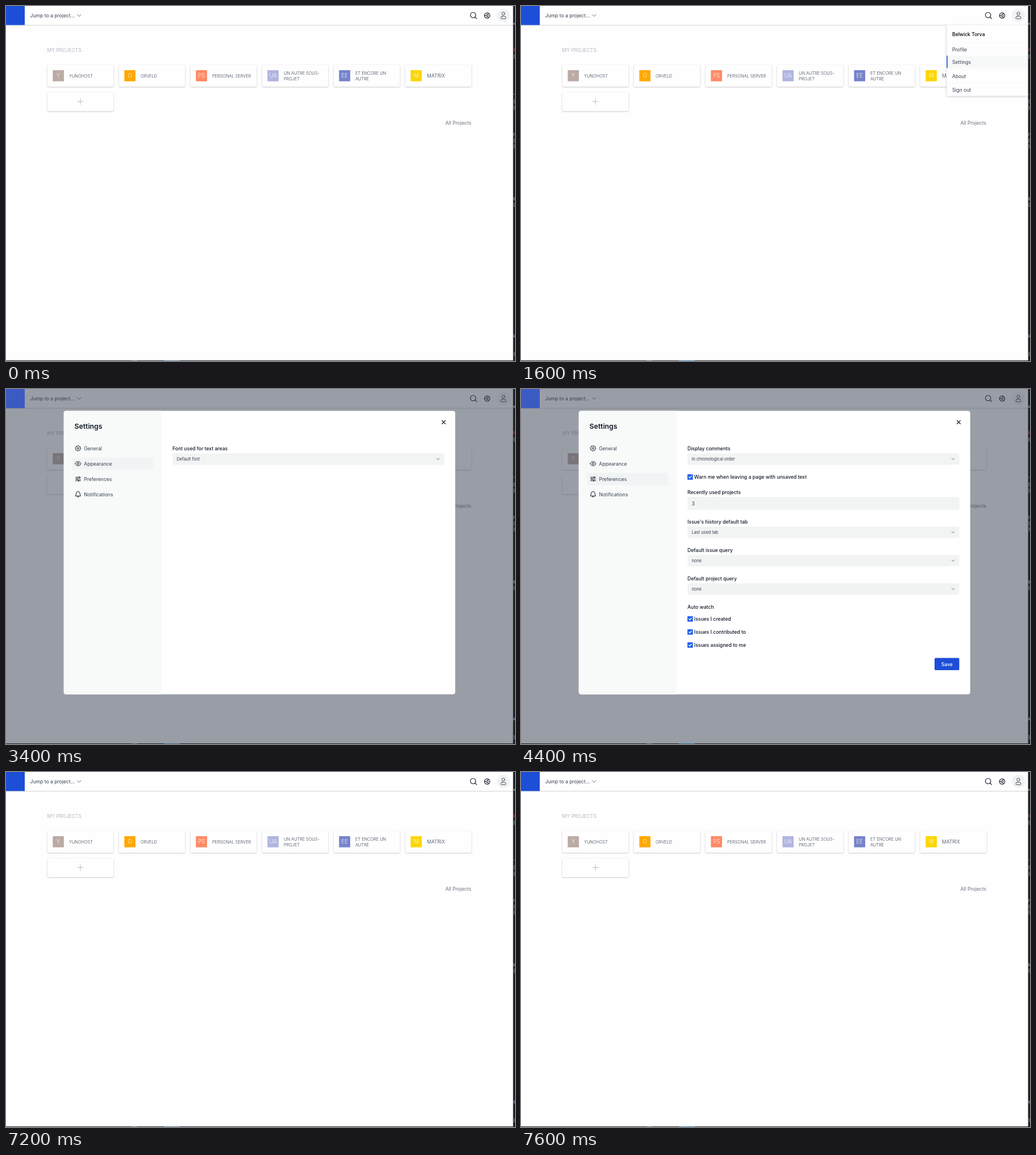
Animation of 896x625 px, one loop 7900 ms. Source, as an HTML page with a canvas:

```html
<!DOCTYPE html>
<html lang="en">
<head>
<meta charset="utf-8">
<title>Project settings</title>
<style>
  html, body { margin: 0; width: 896px; height: 625px; overflow: hidden; background: #fefefe; }
  canvas { display: block; }
</style>
</head>
<body>
<canvas id="stage" width="896" height="625"></canvas>
<script>
const ctx = document.getElementById('stage').getContext('2d');
const LOOP = 7900;
const BASE = 8.6, SMALL = 7.37;
const INK = '#374151', DARK = '#111827', BLUE = '#1d4ed8', FIELD = '#f2f4f4', PAGE = '#fefefe';

function text(str, x, cy, { size = BASE, weight = 400, color = INK, align = 'left', style = '' } = {}) {
  ctx.font = `${style} ${weight} ${size}px Inter, sans-serif`;
  ctx.fillStyle = color;
  ctx.textAlign = align;
  ctx.fillText(str, x, cy + size * 0.364);
  return ctx.measureText(str).width;
}

function box(x, y, w, h, color, radius = 0) {
  ctx.fillStyle = color;
  ctx.beginPath();
  ctx.roundRect(x, y, w, h, radius);
  ctx.fill();
}

function raised(x, y, w, h, blur, alpha, radius = 2) {
  ctx.save();
  ctx.shadowColor = `rgba(0,0,0,${alpha})`;
  ctx.shadowBlur = blur;
  ctx.shadowOffsetY = 0.8;
  box(x, y, w, h, PAGE, radius);
  ctx.restore();
}

function line(points, color = DARK, width = 1) {
  ctx.strokeStyle = color;
  ctx.lineWidth = width;
  ctx.lineCap = ctx.lineJoin = 'round';
  ctx.beginPath();
  points.forEach(([x, y]) => ctx.lineTo(x, y));
  ctx.stroke();
}

function ring(x, y, r, color = DARK, width = 1) {
  ctx.strokeStyle = color;
  ctx.lineWidth = width;
  ctx.beginPath();
  ctx.arc(x, y, r, 0, Math.PI * 2);
  ctx.stroke();
}

function chevron(x, y, s, color = '#6b7280') {
  line([[x - s, y - s / 2], [x, y + s / 2], [x + s, y - s / 2]], color, 1);
}

const polar = (x, y, r, a) => [x + r * Math.cos(a), y + r * Math.sin(a)];

function header(t) {
  raised(0, 0, 893, 33.3, 2, 0.22, 0);
  box(0, 0, 33, 33.5, BLUE);
  text('Jump to a project...', 42.5, 17.3);
  chevron(128.7, 16.7, 3.2);

  ring(822.2, 16, 4.7, DARK, 1.1);
  line([[825.7, 19.5], [828.6, 22.4]], DARK, 1.1);

  ring(847, 16.8, 4.7, DARK, 1.2);
  ring(847, 16.8, 1.8);
  for (let i = 0; i < 3; i++) {
    const a = Math.PI + i * Math.PI * 2 / 3;
    line([polar(847, 16.8, 1.8, a), polar(847, 16.8, 4.7, a)]);
  }

  const hover = t >= 600 && t < 1400 ? (t < 1300 ? 1 : 0.5) : 0;
  const tone = 241 - 10 * hover;
  ctx.fillStyle = `rgb(${tone},${tone + 1},${tone + 2})`;
  ctx.beginPath();
  ctx.arc(875.5, 16.6, 11.6, 0, Math.PI * 2);
  ctx.fill();
  ring(875.5, 13.4, 2.6, INK, 0.9);
  ctx.lineWidth = 0.9;
  ctx.beginPath();
  ctx.roundRect(871, 17.9, 9, 4.6, [3.2, 3.2, 1.5, 1.5]);
  ctx.stroke();
}

const cards = [
  ['Y', '#bcaaa4', 'YUNOHOST'],
  ['O', '#ffa800', 'ORVELD'],
  ['PS', '#ff8a65', 'PERSONAL SERVER'],
  ['UA', '#b0b5e0', 'UN AUTRE SOUS-', 'PROJET'],
  ['EE', '#7683cb', 'ET ENCORE UN', 'AUTRE'],
  ['M', '#fdd600', 'MATRIX']
];

function projects() {
  text('MY PROJECTS', 72.5, 78.3, { weight: 300, color: '#9ca3af' });
  cards.forEach(([initials, color, ...rows], i) => {
    const x = 72.7 + i * 126;
    raised(x, 103.7, 116.6, 38.2, 2.5, 0.24);
    box(x + 9.6, 113, 19.6, 19.6, color);
    text(initials, x + 19.4, 122.9, { size: 9.83, weight: 300, color: 'rgba(255,255,255,.88)', align: 'center' });
    const size = initials === 'M' ? BASE : SMALL;
    rows.forEach((row, k) => {
      const y = 123.3 + (k - (rows.length - 1) / 2) * 9.8;
      text(row, x + 38.3, y, { size, weight: 300 });
    });
  });
  raised(72.7, 151.6, 116.6, 33.4, 2.5, 0.24);
  line([[125.7, 168.2], [136.1, 168.2]], '#b5b8bd', 0.9);
  line([[130.9, 163], [130.9, 173.4]], '#b5b8bd', 0.9);
  text('All Projects', 819, 206, { color: '#6b7280', align: 'right' });
}

function menu(t) {
  raised(749.5, 34, 143.5, 124.3, 4, 0.22, [0, 0, 2, 2]);
  box(749.5, 32.8, 143.5, 2, PAGE);
  box(749.5, 33.4, 143.5, 0.7, '#e4e6e8');
  if (t >= 1300) {
    const y = t < 1600 ? 66 : 87.4;
    ctx.globalAlpha = t < 1400 ? 0.5 : 1;
    box(749.5, y, 143.5, 21.6, '#f7f9f9');
    box(749.3, y, 1.6, 21.6, BLUE);
    ctx.globalAlpha = 1;
  }
  [65.5, 111, 135.2].forEach(y => box(749.5, y, 143.5, 0.6, '#eff1f2'));
  text('Belwick Torva', 759, 50.2, { weight: 500, color: '#000' });
  [['Profile', 77.3], ['Settings', 98.9], ['About', 123.5], ['Sign out', 148]]
    .forEach(([label, y]) => text(label, 759, y));
}

const icons = {
  General(x, y) {
    const teeth = Array.from({ length: 33 }, (_, i) =>
      polar(x, y, i % 4 < 2 ? 4.9 : 3.9, i * Math.PI / 16));
    line(teeth);
    ring(x, y, 1.6);
  },
  Appearance(x, y) {
    ctx.strokeStyle = DARK;
    ctx.lineWidth = 1;
    ctx.beginPath();
    ctx.moveTo(x - 5.2, y);
    ctx.bezierCurveTo(x - 3, y - 5, x + 3, y - 5, x + 5.2, y);
    ctx.bezierCurveTo(x + 3, y + 5, x - 3, y + 5, x - 5.2, y);
    ctx.stroke();
    ring(x, y, 1.7);
  },
  Preferences(x, y) {
    [[-3, 2], [0, -2], [3, 1]].forEach(([dy, knob]) => {
      line([[x - 4.6, y + dy], [x + 4.6, y + dy]]);
      line([[x + knob, y + dy - 0.9], [x + knob, y + dy + 0.9]], DARK, 1.3);
    });
  },
  Notifications(x, y) {
    ctx.strokeStyle = DARK;
    ctx.lineWidth = 1;
    ctx.beginPath();
    ctx.moveTo(x - 4.5, y + 2.6);
    ctx.quadraticCurveTo(x - 3.3, y + 1.2, x - 3.3, y - 1.5);
    ctx.arc(x, y - 1.5, 3.3, Math.PI, 0);
    ctx.quadraticCurveTo(x + 3.3, y + 1.2, x + 4.5, y + 2.6);
    ctx.closePath();
    ctx.stroke();
    line([[x - 1.4, y + 4.5], [x + 1.4, y + 4.5]]);
  }
};

const label = (str, y) => text(str, 293, y, { weight: 500, color: DARK });

function input(name, value, y, w = 478.5) {
  label(name, y);
  box(293, y + 8.6, w, 22.6, FIELD, 2);
  text(value, 300.5, y + 20.4);
}

function select(name, value, y) {
  label(name, y);
  box(293, y + 8.6, 478.5, 20.2, FIELD, 2);
  text(value, 300.5, y + 19, { size: SMALL });
  chevron(760.5, y + 18.6, 2.4);
}

function tick(x, y) {
  box(x, y - 4.8, 9.6, 9.6, '#2563eb');
  line([[x + 2.5, y], [x + 4.1, y + 1.7], [x + 7.2, y - 1.7]], '#fff', 1.2);
}

function option(str, y) {
  tick(293, y + 0.3);
  return 304.8 + text(str, 304.8, y, { weight: 500, color: DARK });
}

function save(y) {
  box(728, y, 43.5, 21.6, BLUE, 2);
  text('Save', 749.7, y + 11, { weight: 500, color: '#fff', align: 'center' });
}

// Four-way mirrored badge built from one quadrant.
function badge(cx, cy) {
  const shapes = [
    [[0, 2], [3, 5], [0, 8]], [[2, 0], [5, 3], [8, 0]],
    [[3.5, 5], [5, 3.5], [8, 6.5], [6.5, 8]],
    [[0, 9.5], [3, 9.5], [6, 12], [3, 15], [0, 15]],
    [[9, 0], [15, 0], [15, 5], [12, 7.5], [9, 4]],
    [[7, 9], [10, 8], [15, 11], [15, 14], [11, 14]],
    [[9.5, 5], [12, 9], [8, 8.5]]
  ];
  ctx.fillStyle = '#8b95a5';
  for (const sx of [-1, 1]) for (const sy of [-1, 1]) {
    shapes.forEach(shape => {
      ctx.beginPath();
      shape.forEach(([x, y]) => ctx.lineTo(cx + sx * x, cy + sy * y));
      ctx.fill();
    });
  }
}

const pages = {
  General() {
    input('First name *', 'Belwick', 104.7, 359);
    input('Last name *', 'Torva', 156.9, 359);
    badge(711.8, 150.3);
    input('Email *', 'torva@example.org', 209.1);
    label('Hide my email address', 261);
    tick(391.7, 261);
    label('Two-factor authentication', 288);
    text('Enable authenticator app', 405, 288, { color: '#3566df' });
    select('Time zone', '(GMT-12:00) International Date Line West', 315);
    save(358.2);
  },
  Appearance() {
    select('Font used for text areas', 'Default font', 104.7);
  },
  Preferences() {
    select('Display comments', 'In chronological order', 104.7);
    option('Warn me when leaving a page with unsaved text', 154.7);
    input('Recently used projects', '3', 181.5);
    select("Issue's history default tab", 'Last used tab', 233.5);
    select('Default issue query', 'none', 283.5);
    select('Default project query', 'none', 333.5);
    label('Auto watch', 383.5);
    option('Issues I created', 404.5);
    option('Issues I contributed to', 427.5);
    option('Issues assigned to me', 450.5);
    save(473.4);
  },
  Notifications() {
    select('Mail notification settings', 'For any event on all my projects', 104.7);
    let x = option('Also notify me about issues with a priority of ', 154.7);
    x += text('haut', x, 154.7, { color: DARK, style: 'italic' });
    text(' or higher', x, 154.7, { weight: 500, color: DARK });
    option("I don't want to be notified of changes that I make myself", 181.7);
    save(201.7);
  }
};

function settings(active) {
  box(0, 0, 893, 624, 'rgba(55,65,81,.5)');
  box(0, 0, 33, 33.5, '#3c5bc2');
  box(101.7, 38.4, 689, 499.2, '#fff', 4);
  box(101.7, 38.4, 172, 499.2, '#f7faf9', [4, 0, 0, 4]);
  text('Settings', 120.6, 66, { size: 12.28, weight: 600, color: DARK });
  line([[767.4, 55.5], [773.4, 61.5]], DARK, 1.1);
  line([[773.4, 55.5], [767.4, 61.5]], DARK, 1.1);
  Object.keys(pages).forEach((name, i) => {
    const y = 104.7 + i * 27;
    if (name === active) box(116.4, y - 10.9, 143.2, 21.8, '#f1f4f4', 2);
    icons[name](126.8, y - 0.3);
    text(name, 137.2, y);
  });
  pages[active]();
}

// Slivers of the editor behind the window.
function desktop() {
  box(892.6, 0, 3.4, 625, '#1e1f22');
  box(0, 624, 896, 1, '#1e1f22');
  box(221, 624, 10, 1, '#55585c');
  box(278, 624, 28, 1, '#356b93');
  ctx.save();
  ctx.beginPath();
  ctx.rect(892.6, 0, 3.4, 624);
  ctx.clip();
  ctx.font = '8px "DejaVu Sans Mono", monospace';
  ctx.textAlign = 'left';
  [[33, 'w'], [79, 'u', '#d04545'], [92, '('], [158, '-'], [171, '('], [182, ')'], [229, 'r'],
   [240, '('], [250, ')'], [342, 's'], [353, '('], [583, 'u', '#a9b9df'], [616, ')']]
    .forEach(([y, str, color = '#a6a9ad']) => {
      ctx.fillStyle = color;
      ctx.fillText(str, 892, y);
    });
  ctx.restore();
}

function draw(now) {
  const t = now % LOOP;
  box(0, 0, 896, 625, PAGE);
  projects();
  header(t);
  if (t >= 900 && t < 1900) menu(t);
  if (t >= 1900 && t < 7200) {
    settings(t < 3400 ? 'General' : t < 4400 ? 'Appearance' : t < 5600 ? 'Preferences' : 'Notifications');
  }
  desktop();
}

const start = performance.now();
function tickFrame() {
  draw(performance.now() - start);
  requestAnimationFrame(tickFrame);
}
tickFrame();
</script>
</body>
</html>
```
